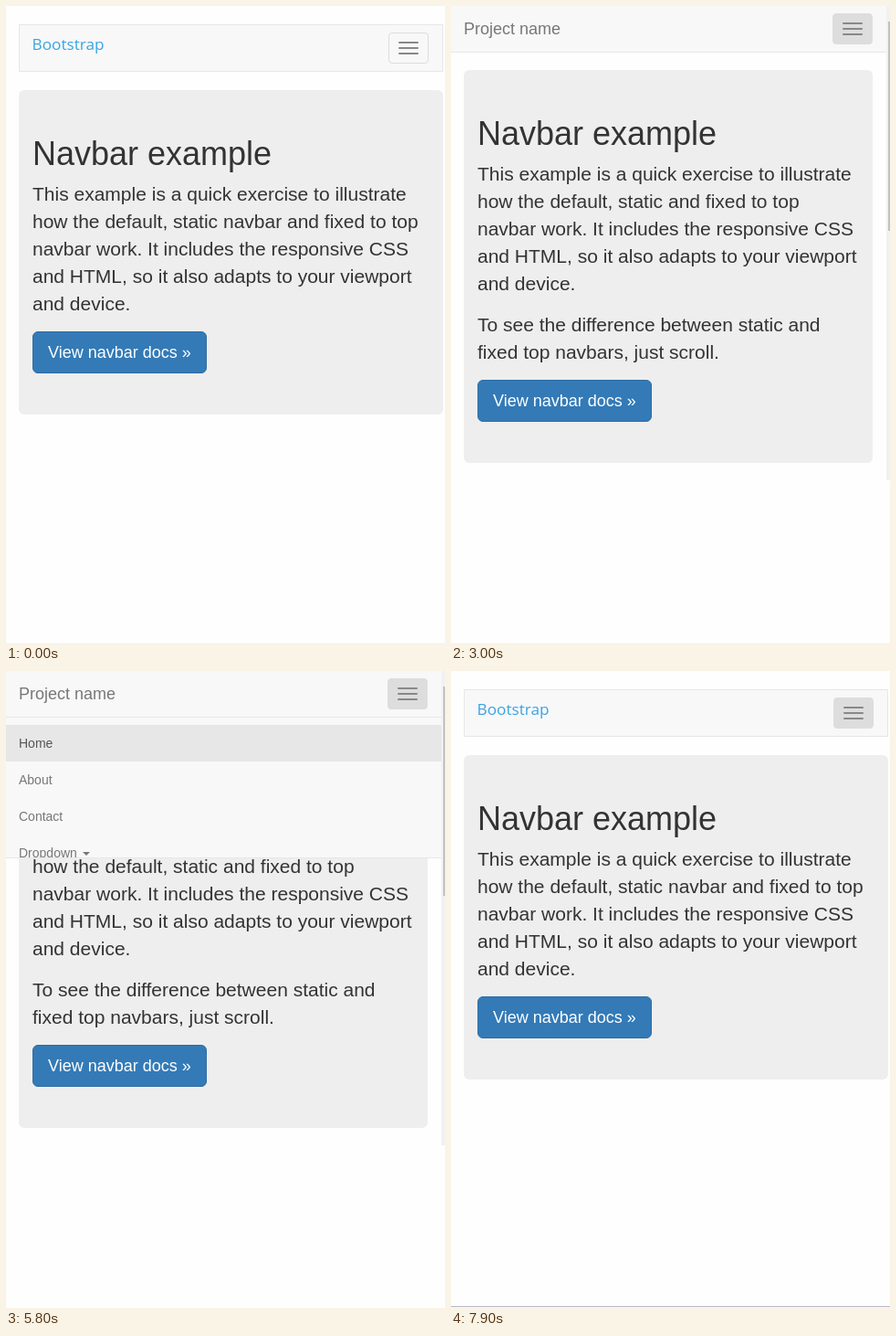
These frames come from a looping animation (481x697 px, 8000 ms). An HTML page:

```html
<!DOCTYPE html>
<html lang="en">
<head>
<meta charset="utf-8">
<title>Navbar example</title>
<style>
* { box-sizing: border-box; }
html, body { margin: 0; width: 100%; height: 100%; overflow: hidden; background: #fefefe; }
body { position: relative; font: 14px/20px "Liberation Sans", Arial, sans-serif; color: #333; }

/* Every animation shares one 8 s clock and changes in hard steps. */
.view, .page, .menu, .toggle, .scroll, .thumb, .edge, .over {
  animation: 8s step-end infinite;
}

.view { position: absolute; left: -1px; top: 0; height: 519px; overflow: hidden; animation-name: width; }
.page { position: absolute; inset: 0; }
.default { animation-name: show-default; }
.static { animation-name: show-static; }
.fixed { animation-name: show-fixed; }

.navbar { position: relative; background: #f8f8f8; border-bottom: 1px solid #e7e7e7; }
.default .navbar { margin: 20px 15px; border: 1px solid #e7e7e7; }
.static .navbar { margin-bottom: 19px; }
.fixed .navbar { position: absolute; z-index: 1; top: 0; left: 0; right: 0; }
.header { position: relative; height: 50px; }
.brand { position: absolute; left: 15px; top: 15px; font-size: 18px; color: #777; white-space: nowrap; }
.default .brand {
  left: 13.6px; top: 11.4px; color: #3aa3e3;
  font: 500 17.2px/20px "Open Sans", "Noto Sans", sans-serif;
}
.toggle {
  position: absolute; right: 15px; top: 8px; width: 44px; height: 34px; padding: 9px 10px;
  border: 1px solid #ddd; border-radius: 4px; animation-name: hover;
}
.toggle i { display: block; height: 2px; margin-bottom: 4px; border-radius: 1px; background: #888; }

.menu { overflow: hidden; box-shadow: inset 0 1px #e7e7e7; animation-name: menu; }
.menu ul { list-style: none; margin: 0; padding: 9px 0 0; }
.menu ul + ul { padding: 7px 0 8px; }
.menu li { height: 40px; padding: 10px 15px; color: #777; white-space: nowrap; }
.menu .active { background: #e7e7e7; color: #555; }
.caret {
  display: inline-block; margin-left: 2px; vertical-align: middle;
  border: 4px solid transparent; border-top-color: currentColor; border-bottom: 0;
}
.over.pick-static { animation-name: pick-static; }
.over.pass-dropdown { animation-name: pass-dropdown; }
.over.pick-fixed { animation-name: pick-fixed; }

.jumbo { margin: 0 15px; padding: 50px 15px 45px; border-radius: 6px; background: #eee; }
.fixed .jumbo { position: absolute; top: 70px; left: 0; right: 0; }
.jumbo h1 { margin: 0 0 10px; font-weight: normal; font-size: 36px; line-height: 39px; }
.jumbo p { margin: 0 0 15px; font-size: 21px; line-height: 30px; }
.button {
  display: block; width: max-content; padding: 10px 16px; border: 1px solid #2e6da4; border-radius: 6px;
  background: #337ab7; color: #fff; font-size: 18px; line-height: 24px;
}

.scroll { position: absolute; left: 477px; top: 0; width: 4px; height: 519px; background: #f1f1f1; animation-name: scroll; }
.thumb { position: absolute; left: 2px; top: 17px; width: 2px; background: #c1c1c1; animation-name: thumb; }
.edge { position: absolute; left: 0; top: 695px; width: 481px; height: 1px; background: #b4b4c6; animation-name: edge; }

@keyframes width {
  0%, 93.75% { width: 495px; }
  10% { width: 478px; }
}
@keyframes scroll {
  0%, 93.75%, 100% { visibility: hidden; }
  10% { visibility: visible; }
}
@keyframes thumb {
  0% { height: 502px; }
  22.5%, 100% { height: 229px; }
}
@keyframes edge {
  0% { visibility: hidden; }
  93.75%, 100% { visibility: visible; }
}
@keyframes show-default {
  0%, 93.75%, 100% { visibility: visible; }
  22.5% { visibility: hidden; }
}
@keyframes show-static {
  0%, 62.5%, 100% { visibility: hidden; }
  22.5% { visibility: visible; }
}
@keyframes show-fixed {
  0%, 93.75%, 100% { visibility: hidden; }
  62.5% { visibility: visible; }
}
@keyframes hover {
  0%, 20%, 57.5%, 93.75% { background: transparent; }
  5%, 37.5%, 68.75%, 98.75%, 100% { background: #ddd; }
}
@keyframes menu {
  0%, 22.5%, 62.5%, 90%, 100% { height: 0; }
  10% { height: 85px; }
  11.25% { height: 243px; }
  42.5%, 71.25% { height: 15px; }
  43.75%, 72.5% { height: 154px; }
  45%, 73.75% { height: 269px; }
  12.5%, 46.25%, 75% { height: 304px; }
  85% { height: 278px; }
  86.25% { height: 94px; }
  87.5% { height: 14px; }
  88.75% { height: 2px; }
}
@keyframes pick-static {
  0%, 22.5%, 100% { color: #777; }
  15% { color: #222; }
}
@keyframes pass-dropdown {
  0%, 52.5%, 100% { color: #777; }
  51.25% { color: #222; }
}
@keyframes pick-fixed {
  0%, 62.5%, 100% { color: #777; }
  55% { color: #222; }
}
</style>
</head>
<body>
<div class="view">
  <section class="page default">
    <nav class="navbar">
      <div class="header"><span class="brand">Bootstrap</span><div class="toggle"><i></i><i></i><i></i></div></div>
      <div class="menu">
        <ul><li class="active">Home</li><li>About</li><li>Contact</li><li>Dropdown<b class="caret"></b></li></ul>
        <ul><li class="active">Default</li><li class="over pick-static">Static top</li><li>Fixed top</li></ul>
      </div>
    </nav>
    <div class="jumbo">
      <h1>Navbar example</h1>
      <p>This example is a quick exercise to illustrate how the default, static navbar and fixed to top navbar work. It includes the responsive CSS and HTML, so it also adapts to your viewport and device.</p>
      <span class="button">View navbar docs »</span>
    </div>
  </section>

  <section class="page static">
    <nav class="navbar">
      <div class="header"><span class="brand">Project name</span><div class="toggle"><i></i><i></i><i></i></div></div>
      <div class="menu">
        <ul><li class="active">Home</li><li>About</li><li>Contact</li><li class="over pass-dropdown">Dropdown <b class="caret"></b></li></ul>
        <ul><li>Default</li><li class="active">Static top</li><li class="over pick-fixed">Fixed top</li></ul>
      </div>
    </nav>
    <div class="jumbo">
      <h1>Navbar example</h1>
      <p>This example is a quick exercise to illustrate how the default, static and fixed to top navbar work. It includes the responsive CSS and HTML, so it also adapts to your viewport and device.</p>
      <p>To see the difference between static and fixed top navbars, just scroll.</p>
      <span class="button">View navbar docs »</span>
    </div>
  </section>

  <section class="page fixed">
    <nav class="navbar">
      <div class="header"><span class="brand">Project name</span><div class="toggle"><i></i><i></i><i></i></div></div>
      <div class="menu">
        <ul><li class="active">Home</li><li>About</li><li>Contact</li><li>Dropdown <b class="caret"></b></li></ul>
        <ul><li>Default</li><li>Static top</li><li class="active">Fixed top</li></ul>
      </div>
    </nav>
    <div class="jumbo">
      <h1>Navbar example</h1>
      <p>This example is a quick exercise to illustrate how the default, static and fixed to top navbar work. It includes the responsive CSS and HTML, so it also adapts to your viewport and device.</p>
      <p>To see the difference between static and fixed top navbars, just scroll.</p>
      <span class="button">View navbar docs »</span>
    </div>
  </section>
</div>
<div class="scroll"><div class="thumb"></div></div>
<div class="edge"></div>
</body>
</html>
```
